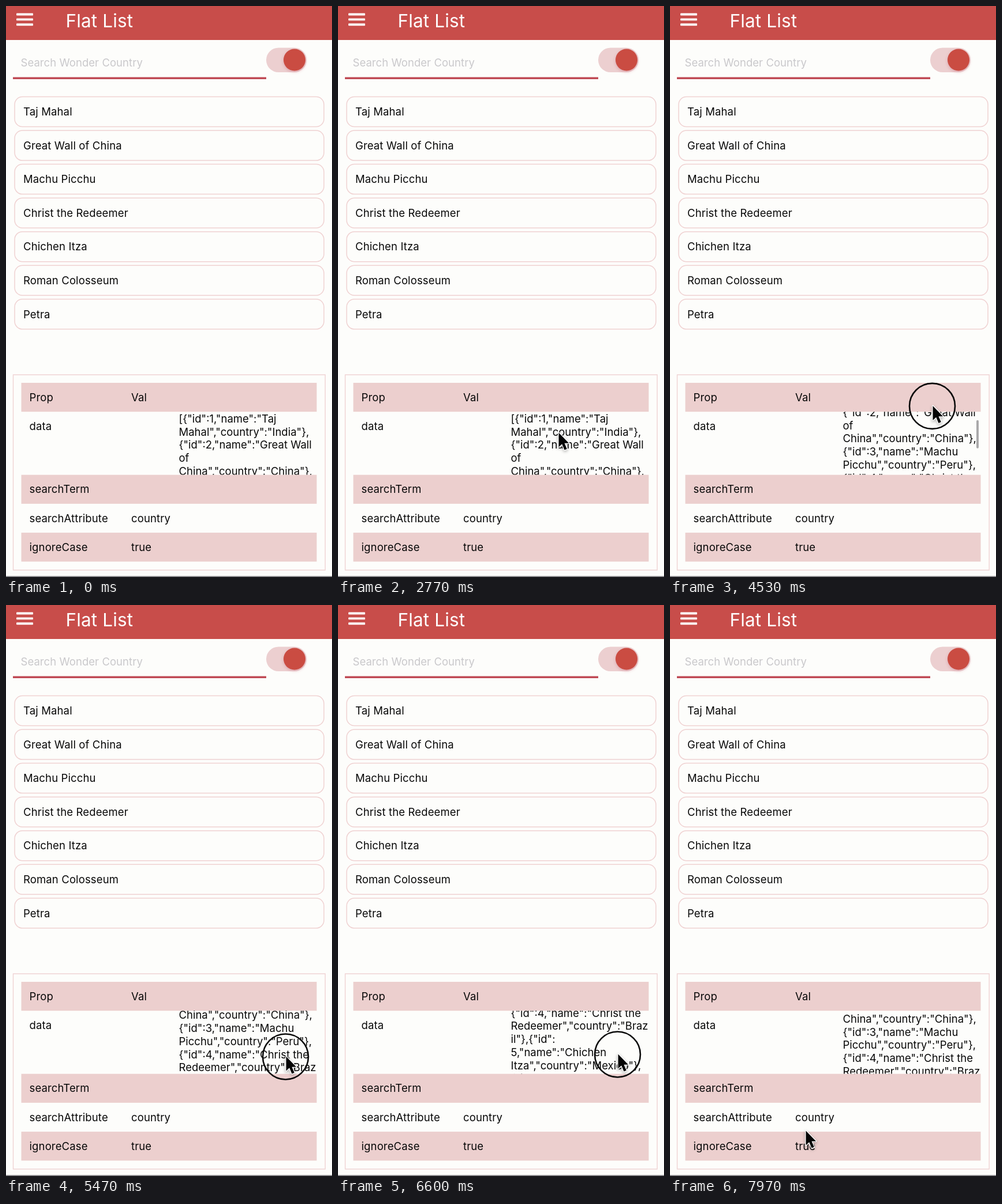
Write an HTML page with a canvas that moves like this. It is 565 px wide and 991 px high and loops after 8 s.

```html
<!DOCTYPE html>
<html lang="en">
<head>
<meta charset="utf-8">
<title>Flat List</title>
<style>
  html, body { margin: 0; width: 100%; height: 100%; overflow: hidden; background: #fdfdfb; }
  canvas { display: block; width: 565px; height: 991px; }
</style>
</head>
<body>
<canvas id="stage"></canvas>
<script>
const W = 565, H = 991, LOOP = 8000;
const canvas = document.getElementById('stage');
const ctx = canvas.getContext('2d');
const ratio = window.devicePixelRatio || 1;
canvas.width = W * ratio;
canvas.height = H * ratio;

const PAPER = '#fdfdfb', ROSE = '#eccfce', RED = '#c84d4a', EDGE = '#f0d2d2';
const LINE = 22.75;
const WONDERS = ['Taj Mahal', 'Great Wall of China', 'Machu Picchu', 'Christ the Redeemer',
  'Chichen Itza', 'Roman Colosseum', 'Petra'];
const PROPS = [['Prop', 'Val'], ['data', ''], ['searchTerm', ''],
  ['searchAttribute', 'country'], ['ignoreCase', 'true']];
const JSON_LINES = ['[{"id":1,"name":"Taj', 'Mahal","country":"India"},',
  '{"id":2,"name":"Great Wall', 'of', 'China","country":"China"},',
  '{"id":3,"name":"Machu', 'Picchu","country":"Peru"},',
  '{"id":4,"name":"Christ the', 'Redeemer","country":"Braz', 'il"},{"id":',
  '5,"name":"Chichen', 'Itza","country":"Mexico"},',
  '{"id":6,"name":"Roman', 'Colosseum","country":"Italy"},'];

// Pointer script: each step eases from where the last one ended.
const ENTER = 250;
const steps = [];
let last = { x: 568, y: 930, scroll: 0 };

function step(start, dur, change, isDrag) {
  const to = { ...last, ...change };
  steps.push({ start, dur, from: last, to, isDrag });
  last = to;
}
const move = (start, dur, x, y) => step(start, dur, { x, y }, false);
const drag = (start, by) =>
  step(start, 500, { y: last.y - by, scroll: last.scroll + by }, true);

move(ENTER, 1450, 527, 774);
move(1700, 1070, 382, 739);
move(2900, 1100, 455, 749);
drag(4250, 95.5);
move(4850, 500, 485, 782);
drag(5530, 72);
move(6050, 400, 485, 778);
drag(6650, -78.5);
move(7200, 770, 235, 911);

function poseAt(t) {
  const s = steps.findLast(s => t >= s.start) || steps[0];
  const u = Math.min(1, Math.max(0, (t - s.start) / s.dur));
  const e = u * u * (3 - 2 * u);
  const mix = key => s.from[key] + (s.to[key] - s.from[key]) * e;
  return { x: mix('x'), y: mix('y'), scroll: mix('scroll') };
}

// The drag under way at t, widened by some time before and after it.
const dragNear = (t, before, after) =>
  steps.find(s => s.isDrag && t >= s.start - before && t < s.start + s.dur + after);

function rect(x, y, w, h, color) {
  ctx.fillStyle = color;
  ctx.fillRect(x, y, w, h);
}

function pill(x, y, w, h, r) {
  ctx.beginPath();
  ctx.roundRect(x, y, w, h, r);
}

function text(str, x, y, { color = '#080808', size = 18.5, spacing = 0.13 } = {}) {
  ctx.font = `${size}px Inter, sans-serif`;
  ctx.letterSpacing = spacing + 'px';
  ctx.fillStyle = color;
  ctx.fillText(str, x, y);
}

function header() {
  rect(0, 0, W, 59, RED);
  ctx.fillStyle = '#fff';
  for (let i = 0; i < 3; i++) {
    pill(18, 12.5 + i * 8.9, 29, 3.9, 1);
    ctx.fill();
  }
  text('Flat List', 103.5, 37, { color: '#fff', size: 31.5, spacing: 0.15 });
}

function search() {
  text('Search Wonder Country', 25.5, 104.5, { color: '#c9c8cb', spacing: 0.05 });
  rect(12, 123.5, 439, 3.5, '#c04a55');
  ctx.fillStyle = '#eccfd0';
  pill(451, 72.5, 70, 42.5, 21.25);
  ctx.fill();
  ctx.save();
  ctx.shadowColor = 'rgba(190,70,90,.3)';
  ctx.shadowBlur = 5 * ratio;
  ctx.shadowOffsetY = 2 * ratio;
  ctx.fillStyle = '#ca4c42';
  ctx.beginPath();
  ctx.arc(500, 93.5, 19, 0, 7);
  ctx.fill();
  ctx.restore();
}

function list() {
  ctx.strokeStyle = EDGE;
  ctx.lineWidth = 1.5;
  WONDERS.forEach((name, i) => {
    const y = 157.5 + i * 58.55;
    pill(15, y, 536, 52, 13.5);
    ctx.stroke();
    text(name, 30, y + 32.7);
  });
}

function dataCell(y, h, scroll, t) {
  ctx.save();
  ctx.beginPath();
  ctx.rect(299, y, 239.5, h);
  ctx.clip();
  JSON_LINES.forEach((line, i) =>
    text(line, 299.5, y + 18.7 + i * LINE - scroll, { spacing: 0 }));
  const active = dragNear(t, 0, 450);
  if (active) {
    const end = active.start + active.dur + 450;
    ctx.globalAlpha = Math.min(1, (end - t) / 250);
    ctx.fillStyle = '#aaa9aa';
    pill(531, y + 1.5 + scroll * 0.23, 4, 49, 2);
    ctx.fill();
  }
  ctx.restore();
}

function table(scroll, t) {
  ctx.strokeStyle = EDGE;
  ctx.lineWidth = 1.4;
  ctx.strokeRect(12.5, 640, 540.7, 339);
  let y = 654;
  PROPS.forEach(([prop, val], i) => {
    const h = prop === 'data' ? 109.5 : 50.2;
    if (i % 2 === 0) rect(26.5, y, 512, h, ROSE);
    else if (prop === 'data') dataCell(y, h, scroll, t);
    text(prop, 40.5, y + 31.7);
    text(val, 217, y + 31.7);
    y += h;
  });
  rect(0, 989.5, W, 1.5, '#77767a');
}

function pointer(x, y, pressed) {
  if (pressed) {
    ctx.strokeStyle = '#0a0a0a';
    ctx.lineWidth = 2.6;
    ctx.beginPath();
    ctx.arc(x - 0.5, y + 2, 39.5, 0, 7);
    ctx.stroke();
  }
  ctx.save();
  ctx.translate(x + 0.5, y + 1.5);
  const arrow = new Path2D('M0 0V25L5.7 19.8L10 30L14.3 28.2L10 18.3H17.6Z');
  ctx.lineJoin = 'round';
  ctx.strokeStyle = '#fff';
  ctx.lineWidth = 2.6;
  ctx.shadowColor = 'rgba(0,0,0,.35)';
  ctx.shadowBlur = 5 * ratio;
  ctx.shadowOffsetY = 2 * ratio;
  ctx.stroke(arrow);
  ctx.shadowColor = 'transparent';
  ctx.fillStyle = '#050505';
  ctx.fill(arrow);
  ctx.restore();
}

function draw(t) {
  const pose = poseAt(t);
  ctx.setTransform(ratio, 0, 0, ratio, 0, 0);
  rect(0, 0, W, H, PAPER);
  header();
  search();
  list();
  table(pose.scroll, t);
  if (t >= ENTER) pointer(pose.x, pose.y, dragNear(t, 100, 0));
}

const start = performance.now();
function frame() {
  draw((performance.now() - start) % LOOP);
  requestAnimationFrame(frame);
}
frame();
</script>
</body>
</html>
```
